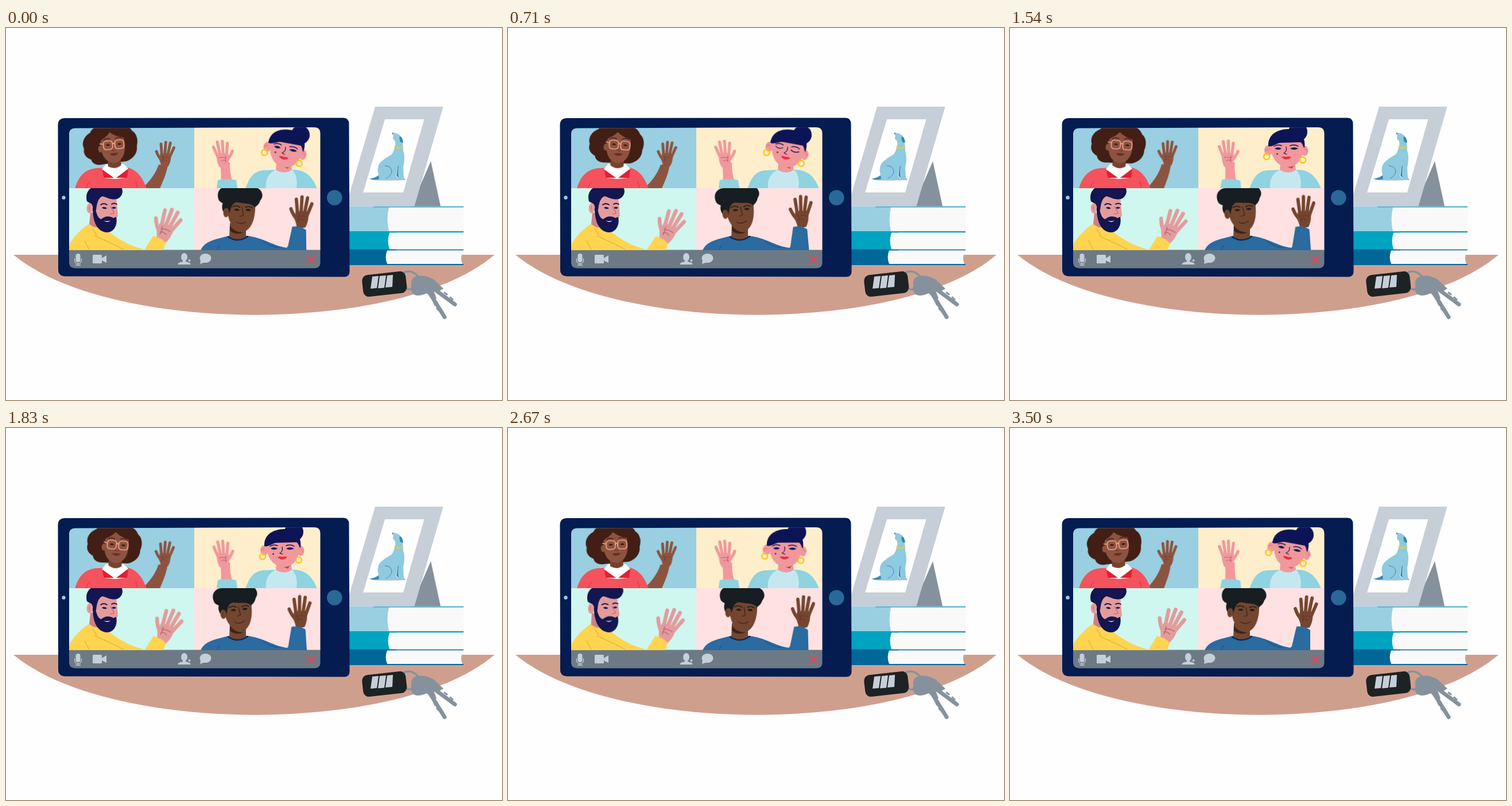
Recreate the animation shown at these times as an HTML page. Size 864 by 648 pixels, loop 3.54 s.

```html
<!DOCTYPE html>
<html lang="en">
<head>
<meta charset="utf-8">
<title>Video call</title>
<style>
html, body { margin: 0; width: 100%; height: 100%; overflow: hidden; background: #fefefe; }
svg { display: block; width: 864px; height: 648px; }
g { --sine: cubic-bezier(.37, 0, .63, 1); }

/* heads: tilt from --a to --b and back within one loop */
.head { animation: 3540ms ease-in-out infinite; }
#ana { --a: -5deg; --b: 5deg; transform-origin: 188px 243px; animation-name: tiltAna; }
#bea { --a: 12deg; --b: 0deg; transform-origin: 482px 236px; animation-name: tiltBea; }
#carl { --a: 0deg; --b: -2deg; transform-origin: 168px 352px; animation-name: tiltCarl; }
#dan { --a: 3.5deg; --b: -3.5deg; transform-origin: 404px 364px; animation-name: tiltDan; }
@keyframes tiltAna {
  0%, 5%, 79%, 100% { transform: rotate(var(--a)); }
  15%, 68% { transform: rotate(var(--b)); }
}
@keyframes tiltBea {
  0%, 20.5%, 83%, 100% { transform: rotate(var(--a)); }
  30%, 73% { transform: rotate(var(--b)); }
}
@keyframes tiltCarl {
  0%, 53%, 94%, 100% { transform: rotate(var(--a)); }
  63%, 86% { transform: rotate(var(--b)); }
}
@keyframes tiltDan {
  0%, 4%, 63%, 100% { transform: rotate(var(--a)); }
  15%, 53% { transform: rotate(var(--b)); }
}

/* waving arms */
.wave { animation: slow 3540ms var(--sine) infinite; }
.quick { animation: swing 147.5ms -35ms var(--sine) infinite alternate; }
#armAna { --to: -3.2deg; transform-origin: 252px 272px; }
#armBea { --to: 3.2deg; transform-origin: 385px 268px; }
#armCarl { --to: 3.2deg; transform-origin: 246px 390px; }
#armDan { --to: -5.2deg; transform-origin: 505px 372px; }
@keyframes swing { to { transform: rotate(var(--to)); } }
@keyframes slow {
  0%, 18.18%, 36.36%, 54.55%, 72.73%, 90.91% { transform: rotate(0deg); }
  9.09%, 27.27%, 45.45%, 63.64%, 81.82%, 100% { transform: rotate(var(--to)); }
}

/* blinks */
.open, .shut { animation: 3540ms step-end infinite; }
.shut { opacity: 0; }
#bea .open { animation-name: hideBea; }
#bea .shut { animation-name: showBea; }
#carl .open { animation-name: hideCarl; }
#carl .shut { animation-name: showCarl; }
@keyframes hideBea { 0%, 23.5% { opacity: 1; } 18.8% { opacity: 0; } }
@keyframes showBea { 0%, 23.5% { opacity: 0; } 18.8% { opacity: 1; } }
@keyframes hideCarl { 0%, 27.5%, 88% { opacity: 1; } 24%, 84% { opacity: 0; } }
@keyframes showCarl { 0%, 27.5%, 88% { opacity: 0; } 24%, 84% { opacity: 1; } }

.line { fill: none; stroke-linecap: round; stroke-linejoin: round; }
</style>
</head>
<body>
<svg viewBox="0 0 864 648">
  <defs>
    <clipPath id="screen"><path d="M121 174.500L537 173Q547.500 173 547.500 184V408Q547.500 418.500 537 418.500H121Q110 418.500 110 408V185Q110 174.500 121 174.500Z"/></clipPath>
    <clipPath id="top"><rect x="110" y="172" width="438" height="107"/></clipPath>
    <clipPath id="low"><rect x="110" y="279" width="438" height="107.500"/></clipPath>
    <g id="hand">
      <g class="line" stroke="currentColor" stroke-width="4.800">
        <path d="M12 34Q6 28 3 19M12.500 27L11 6M17.500 26L19.300 2.800M22.500 26L27.300 4.300M26 29L33.500 12.500"/>
      </g>
      <path fill="currentColor" d="M10 22L26.500 23L28.300 29Q28 38 23.500 45L11 46Q11 40 7.500 32Z"/>
      <path class="line" stroke="#5a1230" stroke-opacity=".4" stroke-width=".9" d="M13 30Q18 28 25 30M13 34Q17 32 21 35M13.500 26.500Q15 31 13.500 37"/>
    </g>
  </defs>

  <path fill="#cf9f8e" d="M13 395C181 534.500 689 534.500 851 395Z"/>

  <!-- books -->
  <path fill="#99cfe1" d="M590 310.500H797V313H670V354H590Z"/>
  <path fill="#5fb3cd" d="M640 310.500H797V312.800H640Z"/>
  <path fill="#00a3c0" d="M590 354H797V356.500H680V386H590Z"/>
  <path fill="#00679a" d="M590 385.500H797V387.500H680V411H797V413H590Z"/>
  <g fill="#f9f9fa">
    <path d="M667 312.800H797V354H667Q662 333 667 312.800Z"/>
    <path d="M668 356.500H797V385.500H668Q663 371 668 356.500Z"/>
    <path d="M664 387.500H797Q790 400 795 411H664Q659 399 664 387.500Z"/>
  </g>

  <!-- photo frame -->
  <path fill="#85929d" d="M740 232L757 310.500H706Z"/>
  <path fill="#c6ced7" d="M643 137H761.500L711.500 310.500H592Z"/>
  <path fill="#fefefe" d="M660 159H728.500L692 286.500H622Z"/>
  <ellipse cx="665" cy="263.500" rx="30" ry="2.300" fill="#b9c0c8"/>
  <path fill="#8ecae0" d="M673 183Q679 181 685 186Q690 189 691 198L692 214Q696 225 692 243L693 261Q698 264 695 265H684L685 260L682 245L679 257Q683 262 685 264H660Q648 266 633 263Q642 261 649 256Q645 244 652 234Q661 226 672 220Q676 214 678 205Q679 199 677 196Q672 193 675 188Z"/>
  <path fill="#3989b0" d="M685 190Q690 187 692 199Q687 201 686 196ZM672 183L675 182L674 186Z"/>
  <path fill="#3989b0" d="M649 257Q641 263 633 262Q640 266 650 263ZM683 240L680 257L685 262Q682 252 684 240Z"/>
  <path class="line" stroke="#3989b0" d="M660 240Q672 240 672 251Q670 258 662 262"/>
  <path class="line" stroke="#fdc52c" stroke-width="2.800" d="M677.500 207.500Q684 210 691 207.500"/>

  <!-- keys -->
  <g class="line" stroke="#85929d">
    <path stroke-width="7" d="M737 460L764 503.500"/>
    <path stroke-width="7" d="M742 452L782 481.500"/>
    <path stroke-width="3" d="M747 482L745 477M755 493L751 489M764 461L768 464M774 469L778 473"/>
  </g>
  <path fill="#85929d" d="M706 449Q704 435 716 432Q729 429 745 438L762 454L755 458L742 450L750 471L744 474L733 462Q715 470 708 462Q704 456 706 449Z"/>
  <path class="line" stroke="#85929d" stroke-width="3.500" d="M689 441C685 423 704 418 717 432M710 453Q703 458 697 453"/>
  <rect x="621" y="427" width="76.500" height="38" rx="10" fill="#1d2224" transform="rotate(-6.500 659 446)"/>
  <path fill="#c6ced7" d="M638 433L649 432L646 453L635 454ZM651 432L662 431L659 452.500L648 453.500ZM664 431L674 430L673 451L661 452Z"/>

  <!-- tablet -->
  <path fill="#041c50" d="M103 157L588 156.500Q597.500 157 597.500 167L598.500 424Q598.500 433.500 589 433.500L103 432.500Q91 432 91 421L90.500 169Q90.500 157 103 157Z"/>
  <circle cx="100.500" cy="295.500" r="3.200" fill="#99cfe1"/>
  <circle cx="572.300" cy="295.500" r="13.300" fill="#2a6898"/>

  <g clip-path="url(#screen)">
    <path fill="#99cfe1" d="M110 172H328V279H110Z"/>
    <path fill="#feeecb" d="M328 172H548V279H328Z"/>
    <path fill="#cff7ef" d="M110 279H328V387H110Z"/>
    <path fill="#ffe1e2" d="M328 279H548V387H328Z"/>
    <path fill="#6d7a85" d="M110 386.500H548V420H110Z"/>

    <g clip-path="url(#top)">
      <!-- Ana -->
      <g id="armAna" class="wave" color="#8c5440">
        <path fill="currentColor" d="M232 284C248 270 260 256 266 238L282 239C279 256 272 270 266 284Z"/>
        <use href="#hand" transform="translate(259 196)"/>
      </g>
      <path fill="#f4525c" d="M120 280C126 258 138 245 160 244L212 243C228 247 238 260 245 280Z"/>
      <path class="line" stroke="#d72f43" d="M139 279Q142 271 147 267M229 279L226 267"/>
      <path fill="#fefefe" d="M174 237H205L213 245L209 261L190 263L170 261L167 246Z"/>
      <path fill="#e01f35" d="M167 246L188 261H170ZM213 245L211 261H192Z"/>
      <g id="ana" class="head">
        <path fill="#421e14" d="M152 179C158 166 180 168 190 171C206 164 221 172 225 182C234 188 234 201 231 209C232 222 221 232 210 234L168 236C157 238 150 231 150 226C139 221 137 213 139 206C134 194 143 183 152 179Z"/>
        <path fill="#75422f" d="M178 222H201V240Q190 248 178 240Z"/>
        <path fill="#8c5440" d="M169 195C173 191 181 188 186 181C193 188 202 190 209 192C213 212 208 232 191 235C175 235 165 218 169 195Z"/>
        <ellipse cx="167" cy="209" rx="3.500" ry="6" fill="#8c5440"/>
        <g class="line" stroke="#421e14" stroke-width="1.500">
          <path d="M174 194Q179 190 185 193M195 193Q201 189 207 193"/>
          <path d="M190 204L187 213Q190 215 193 213" stroke="#6b3427" stroke-width="1.200"/>
        </g>
        <path fill="#34150f" d="M177 203Q181 200 185 203Q181 206 177 203ZM197 203Q201 200 205 203Q201 206 197 203Z"/>
        <g class="line" stroke="#f3a18f" stroke-width="1.700">
          <rect x="173" y="196" width="16" height="15" rx="5"/>
          <rect x="193" y="196" width="16" height="15" rx="5"/>
          <path d="M189 202Q191 200 193 202M173 201L167 200"/>
        </g>
        <path fill="#6a2c28" d="M182 219Q190 217 198 218.500Q190 226 182 219Z"/>
      </g>

      <!-- Bea -->
      <g id="armBea" class="wave" color="#f0989c">
        <path fill="currentColor" d="M372 234L390 234Q389 252 396 272H374Q376 251 372 234Z"/>
        <use href="#hand" transform="translate(397.500 194) scale(-1.080 1.080)"/>
        <path fill="#8fd2e0" d="M366 284L369 265Q386 261 401 265L404 284Z"/>
      </g>
      <path fill="#8fd2e0" d="M417 280C424 259 432 250 447 248L470 247H505C525 249 535 262 542 280Z"/>
      <path fill="#c5e8f0" d="M453 280C451 264 458 252 470 247H498C506 254 508 266 506 280Z"/>
      <path fill="#f0989c" d="M471 235H496L498 247Q485 256 470 247Z"/>
      <path fill="#9b5265" d="M476 239H495L491 245Z"/>
      <g id="bea" class="head">
        <circle cx="501.500" cy="181" r="16.500" fill="#0d1456"/>
        <g fill="#f0989c">
          <ellipse cx="450" cy="213" rx="7" ry="9"/>
          <ellipse cx="513.500" cy="214" rx="6" ry="9"/>
          <path d="M454 198H511C514 222 503 242 484 242C464 242 452 222 454 198Z"/>
        </g>
        <path fill="#0d1456" d="M450 206C449 187 463 177 484 176C506 176 516 192 513 209C510 207 510 201 506 199L470 200C462 202 458 207 450 206Z"/>
        <g class="line" stroke="#fdc514" stroke-width="2.500">
          <circle cx="447" cy="224" r="5"/>
          <circle cx="510" cy="230" r="5"/>
        </g>
        <g class="line" stroke="#0d1456" stroke-width="1.500">
          <path d="M460 206Q466 202 473 205M488 205Q496 202 502 206"/>
          <path d="M481 207Q483 215 477 218L482 220" stroke-width="1.200"/>
          <path d="M450 211Q446 209 445 214M513 211Q517 210 517 215" stroke="#d96478" stroke-width="1"/>
        </g>
        <path class="open" fill="#0d1456" d="M461 210Q467 206 473 210Q467 214 461 210ZM488 210Q495 206 502 210Q495 214 488 210Z"/>
        <path class="line shut" stroke="#0d1456" stroke-width="1.500" d="M461 210Q467 214 473 210M488 211Q495 215 502 211"/>
        <path fill="#e8303f" d="M473 225Q478 223 481 224.500Q486 223 490 225Q481 233 473 225Z"/>
        <circle cx="465.500" cy="219.500" r="1.200" fill="#0d1456"/>
      </g>
    </g>

    <g clip-path="url(#low)">
      <!-- Carl -->
      <g id="armCarl" class="quick" color="#e39c9c">
        <use href="#hand" transform="translate(264 305) rotate(16) scale(1.380)"/>
        <path fill="#ffd44f" d="M238 392L256 362Q270 365 278 374L272 392Z"/>
      </g>
      <path fill="#ffd44f" d="M108 388L112 374C121 360 132 350 143 342L156 345L181 356Q201 372 222 380L247 388Z"/>
      <path class="line" stroke="#d9a62e" d="M137 371L145 386M155 362L181 374L205 386M151 350L158 361"/>
      <g id="carl" class="head">
        <path fill="#cf7f88" d="M147 322H164V348L154 347L145 342Z"/>
        <path fill="#e39c9c" d="M151 293H192L195 327L188 337H158Q150 324 151 293Z"/>
        <path fill="#131650" d="M141 302C137 287 146 274 165 274H196C207 279 204 294 193 298C182 300 176 295 168 293C159 297 158 309 157 317L151 318L148 306Z"/>
        <ellipse cx="146" cy="314" rx="5.500" ry="9" fill="#e39c9c"/>
        <path fill="#131650" d="M151 313L156 314C157 322 160 332 166 333C172 327 181 327 187 331L192 329C195 343 188 356 176 356C160 355 151 340 151 313Z"/>
        <path fill="#fefefe" d="M170 335Q176 338 182 335Q177 341 170 335Z"/>
        <g class="line" stroke="#131650" stroke-width="1.800">
          <path d="M165 308Q170 304 176 308M184 307Q188 304 193 307"/>
          <path d="M182 311Q188 320 188 323L182 324" stroke="#c65c6d" stroke-width="1.200"/>
          <path d="M146 310Q143 313 146 317" stroke="#c65c6d" stroke-width="1"/>
        </g>
        <path class="open" fill="#131650" d="M167 313Q171 310 176 314Q171 317 167 313ZM184 313Q188 310 192 313Q188 317 184 313Z"/>
        <path class="line shut" stroke="#131650" stroke-width="1.400" d="M167 314Q172 319 177 316M184 316Q189 318 194 315"/>
      </g>

      <!-- Dan -->
      <g id="armDan" class="quick" color="#74462f">
        <use href="#hand" transform="translate(493.500 291) scale(1.200 1.260)"/>
        <path fill="#2a6ba0" d="M476 396L491 380L499 346Q512 344 523 352V396Z"/>
      </g>
      <path fill="#2a6ba0" d="M339 388C345 370 368 368 388 362H420C448 365 466 380 490 383L520 376V388Z"/>
      <path class="line" stroke="#1b4b7c" d="M447 371Q458 380 476 383M368 386L372 379"/>
      <path fill="#74462f" d="M390 340H418V362Q404 374 389 364Z"/>
      <path fill="#3f241a" d="M390 344Q398 356 414 356Q400 362 390 353Z"/>
      <path class="line" stroke="#14264d" stroke-width="2.500" d="M387 364Q404 375 421 363"/>
      <g id="dan" class="head">
        <path fill="#74462f" d="M384 299H430C433 323 430 346 415 354C401 357 388 345 384 325Z"/>
        <path fill="#171d20" d="M366 300C361 286 370 277 382 277L425 275C441 276 446 290 439 298C437 306 433 308 430 311C428 306 420 305 410 305C400 304 395 301 390 311L385 328C377 327 371 317 374 307Q367 304 366 300Z"/>
        <ellipse cx="381" cy="323" rx="5" ry="8" fill="#74462f"/>
        <g class="line" stroke="#171d20" stroke-width="1.700">
          <path d="M392 312Q398 308 404 312M414 312Q420 308 426 312"/>
          <path d="M408 312L411 326L405 328M400 338Q408 343 417 337" stroke="#3d2118" stroke-width="1.300"/>
          <path d="M381 319Q378 323 381 327" stroke="#4b2a1d" stroke-width="1"/>
        </g>
        <path fill="#171d20" d="M394 317Q399 313 404 317Q399 320 394 317ZM414 316Q419 312 424 316Q419 320 414 316Z"/>
      </g>
    </g>

    <!-- toolbar -->
    <g fill="#c6ced7">
      <rect x="121.500" y="393" width="8" height="15" rx="4"/>
      <rect x="151" y="395" width="16" height="15" rx="1.500"/>
      <path d="M167 401L175 396V409L167 405Z"/>
      <ellipse cx="310.500" cy="399" rx="5.500" ry="7"/>
      <path d="M308 403H313V407Q321 408 322 412H299Q300 408 308 407Z"/>
      <ellipse cx="347.500" cy="401" rx="10" ry="8"/>
      <path d="M339 404L338 411L347 408Z"/>
    </g>
    <g class="line" stroke="#c6ced7" stroke-width="1.300">
      <path d="M119.500 402V405Q120 410 125.500 410.500Q131 410 131.500 405V402M125.500 410V413M121.500 413H129.500"/>
      <path d="M317.500 405H321.500M319.500 403V407"/>
    </g>
    <path class="line" stroke="#f5404f" stroke-width="2.300" d="M524.500 396.500L537.500 409.500M537.500 396.500L524.500 409.500"/>
  </g>
</svg>
</body>
</html>
```
